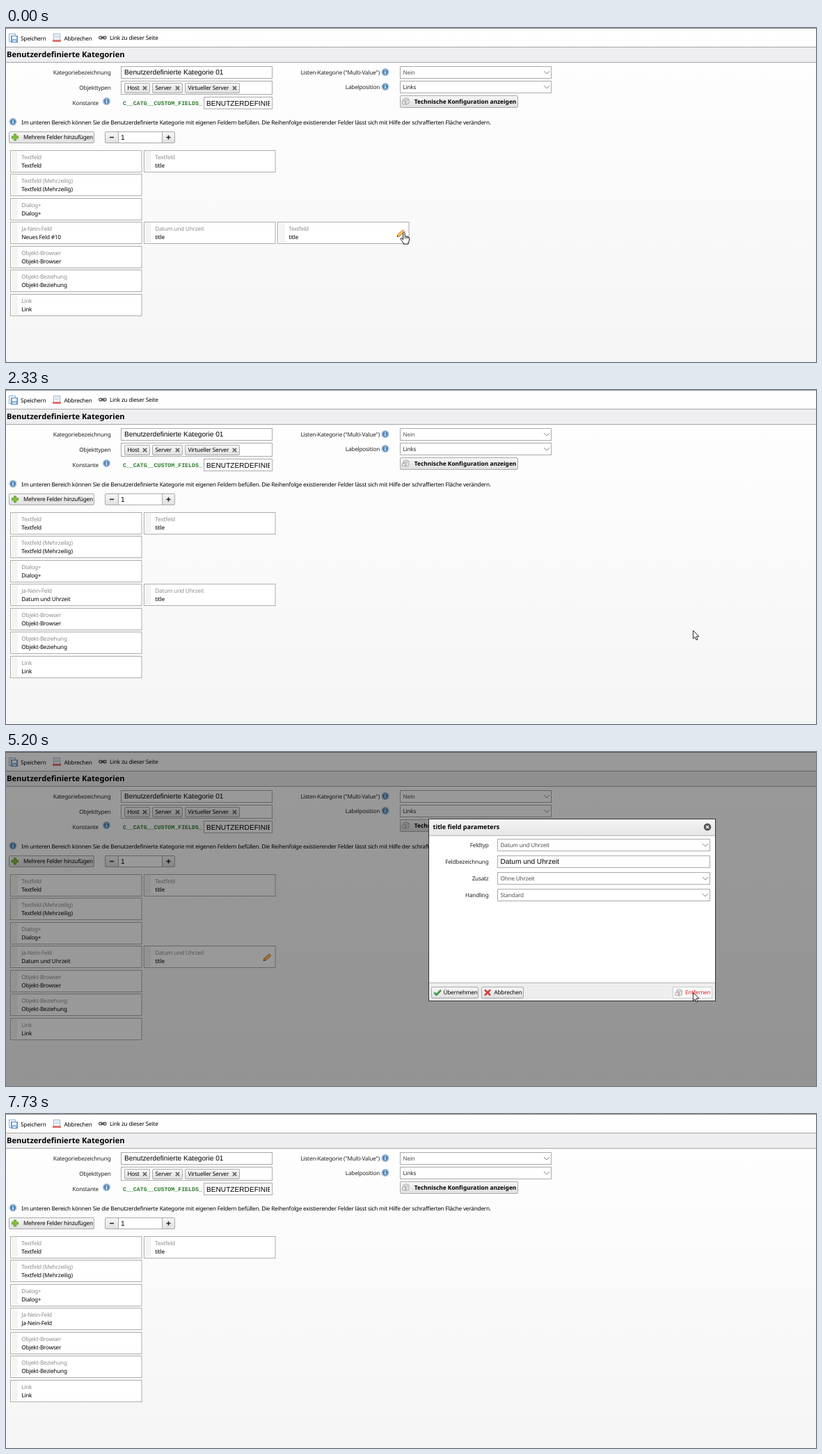
An HTML page with a canvas for the animation above (8.19 s loop, 1164 by 481 pixels).

```html
<!DOCTYPE html>
<html lang="de">
<head>
<meta charset="utf-8">
<title>Benutzerdefinierte Kategorien</title>
<style>
html, body { margin: 0; width: 100%; height: 100%; overflow: hidden; background: #fff; }
canvas { display: block; width: 1164px; height: 481px; }
</style>
</head>
<body>
<canvas id="stage" width="1164" height="481"></canvas>
<script>
const ctx = document.getElementById('stage').getContext('2d');
const W = 1164, H = 481, LOOP = 8190, TICK = 200 / 3;
const UI = '8.2px "Noto Sans", sans-serif';
const FIELD = '10.15px "Liberation Sans", Arial, sans-serif';
const bold = size => `bold ${size}px "Noto Sans", sans-serif`;

function text(str, x, y, { font = UI, color = '#000', align = 'left' } = {}) {
  ctx.font = font;
  ctx.letterSpacing = font === UI ? '-0.2px' : '0px';
  ctx.textRendering = 'geometricPrecision';
  ctx.textAlign = align;
  ctx.fillStyle = color;
  ctx.fillText(str, x, y);
}

function rect(x, y, w, h, fill) {
  ctx.fillStyle = fill;
  ctx.fillRect(x, y, w, h);
}

function box(x, y, w, h, fill = '#fff', border = '#aaa') {
  rect(x, y, w, h, border);
  rect(x + 1, y + 1, w - 2, h - 2, fill);
}

function shade(y, h, top, bottom) {
  const g = ctx.createLinearGradient(0, y, 0, y + h);
  g.addColorStop(0, top);
  g.addColorStop(1, bottom);
  return g;
}

// Flat list of x, y pairs.
function trace(pts, closed) {
  ctx.beginPath();
  for (let i = 0; i < pts.length; i += 2) ctx.lineTo(pts[i], pts[i + 1]);
  if (closed) ctx.closePath();
}

function line(pts, color, width = 1) {
  trace(pts);
  ctx.strokeStyle = color;
  ctx.lineWidth = width;
  ctx.stroke();
}

function shape(pts, fill, stroke, width = 1) {
  trace(pts, true);
  ctx.fillStyle = fill;
  ctx.fill();
  if (stroke) {
    ctx.strokeStyle = stroke;
    ctx.lineWidth = width;
    ctx.lineJoin = 'round';
    ctx.stroke();
  }
}

function disc(x, y, r, fill) {
  ctx.beginPath();
  ctx.arc(x, y, r, 0, 7);
  ctx.fillStyle = fill;
  ctx.fill();
}

function at(x, y, draw) {
  ctx.save();
  ctx.translate(x, y);
  draw();
  ctx.restore();
}

function cross(x, y, r, color, width) {
  line([x - r, y - r, x + r, y + r], color, width);
  line([x + r, y - r, x - r, y + r], color, width);
}

function plus(x, y, r, color, width) {
  line([x - r, y, x + r, y], color, width);
  line([x, y - r, x, y + r], color, width);
}

function info(x, y) {
  disc(x, y, 5.5, '#9fb8d0');
  disc(x, y, 4.8, '#d3e0ec');
  disc(x, y, 4.2, '#5288ba');
  rect(x - 0.7, y - 3, 1.4, 1.4, '#fff');
  rect(x - 0.7, y - 0.8, 1.4, 3.6, '#fff');
}

function button(x, y, w, h) {
  ctx.beginPath();
  ctx.roundRect(x + 0.5, y + 0.5, w - 1, h - 1, 1.5);
  ctx.fillStyle = shade(y, h, '#f8f8f8', '#dedede');
  ctx.fill();
  ctx.strokeStyle = '#aaa';
  ctx.lineWidth = 1;
  ctx.stroke();
}

function select(x, y, w, value, color = '#505050') {
  box(x, y, w, 18);
  text(value, x + 4.5, y + 12, { color });
  const r = x + w - 11;
  line([r, y + 7, r + 4, y + 11, r + 8, y + 7], '#777', 0.9);
}

function store(x, y) {
  shape([x - 3, y - 3, x + 1, y - 5, x + 5, y - 3, x + 5, y + 3, x + 1, y + 5, x - 3, y + 3], '#e2e2e2', '#a2a2a2', 0.8);
  line([x - 3, y - 3, x + 1, y - 1, x + 5, y - 3], '#aaa', 0.8);
  line([x + 1, y - 1, x + 1, y + 5], '#aaa', 0.8);
  disc(x - 2.5, y + 2, 2.7, '#999');
  disc(x - 2.5, y + 2, 1.9, '#eee');
}

function pencil(x, y, alpha) {
  ctx.save();
  ctx.globalAlpha = alpha;
  shape([x - 5.5, y + 5, x - 4.6, y + 1.5, x + 2.5, y - 4.8, x + 5.2, y - 2, x - 2, y + 4.3], '#f3b341', '#b87a22', 0.8);
  line([x - 3, y + 2.5, x + 3.6, y - 3.3], '#ffe09a', 1);
  shape([x + 2, y - 4.2, x + 3.4, y - 5.4, x + 5.9, y - 2.8, x + 4.6, y - 1.6], '#e59a76');
  shape([x - 5.7, y + 5.2, x - 5, y + 3, x - 3.5, y + 4.6], '#403020');
  ctx.restore();
}

function card(col, row, kind, title) {
  const x = 6 + col * 192, y = Math.floor(176 + row * 34.5);
  box(x, y, 189.5, 32, '#fff', '#adadad');
  for (let i = 0; i < 4; i++)
    for (let j = 0; j < 14; j++) rect(x + 3 + i * 2, y + 2 + j * 2, 1, 1, '#d2d2d2');
  text(kind, x + 16.2, y + 13, { color: '#8c8c8c' });
  text(title, x + 16.2, y + 25.3);
}

function toolbar() {
  rect(0, 0, W, 1, '#8c8c8c');
  box(4, 8, 10, 12, '#f2f7fc', '#8db3d8');
  box(7, 11, 10, 10, '#86b3de', '#5a8fc4');
  rect(9, 12, 6, 4, '#f4f9ff');
  rect(10, 18, 4, 2, '#eaf2fa');
  text('Speichern', 21, 17.5);

  box(68, 8, 10, 12, '#f2f6fb', '#9db6d4');
  rect(70, 11, 6, 1, '#c0d0e2');
  rect(70, 13, 6, 1, '#c0d0e2');
  rect(67, 17, 12, 3, '#e0726c');
  text('Abbrechen', 83.5, 17.5);

  ctx.strokeStyle = '#444';
  ctx.lineWidth = 1.2;
  for (const x of [133.6, 139.4]) {
    ctx.beginPath();
    ctx.roundRect(x, 12.2, 4.8, 3.6, 1.7);
    ctx.stroke();
  }
  line([136, 14, 142, 14], '#444', 1.2);
  text('Link zu dieser Seite', 149, 16.8);

  rect(0, 27, W, 23, '#a6a6a6');
  rect(0, 28, W, 21, '#eeeef0');
  text('Benutzerdefinierte Kategorien', 1, 42.2, { font: bold(11.1) });
}

function chip(x, w, label) {
  button(x, 79, w, 15);
  text(label, x + 4.5, 89.3);
  cross(x + w - 7.5, 86.5, 2.6, '#666', 1.6);
}

function form() {
  const right = { align: 'right', color: '#222' };
  text('Kategoriebezeichnung', 150.5, 66.7, right);
  text('Objekttypen', 150.5, 89.2, right);
  text('Konstante', 133, 111.2, right);
  text('Listen-Kategorie ("Multi-Value")', 537, 66.7, right);
  text('Labelposition', 537, 87.8, right);
  info(144.5, 105.5);
  info(545, 63.5);
  info(545, 84.5);

  box(165, 55, 218, 18);
  text('Benutzerdefinierte Kategorie 01', 170, 67.3, { font: FIELD });
  box(165, 76, 218, 20);
  chip(170, 37, 'Host');
  chip(210, 44, 'Server');
  chip(257, 79, 'Virtueller Server');
  text('C__CATG__CUSTOM_FIELDS_', 168, 110.5, {
    font: 'bold 8.26px "Liberation Mono", monospace', color: '#2f7d2f'
  });
  box(284, 99, 99, 18);
  ctx.save();
  ctx.beginPath();
  ctx.rect(285, 99, 94, 18);
  ctx.clip();
  text('BENUTZERDEFINIERTE', 288, 111.6, { font: FIELD });
  ctx.restore();

  select(566, 55, 218, 'Nein');
  select(566, 76, 218, 'Links', '#222');
  button(566, 97, 170, 18);
  store(574, 105.5);
  text('Technische Konfiguration anzeigen', 586.7, 108.6, { font: bold(8.4) });

  info(10, 135);
  text('Im unteren Bereich können Sie die Benutzerdefinierte Kategorie mit eigenen Feldern befüllen. ' +
    'Die Reihenfolge existierender Felder lässt sich mit Hilfe der schraffierten Fläche verändern.', 22.3, 138.8);

  button(4, 149, 123, 17);
  plus(13, 157.3, 5, '#5f9a2c', 4);
  plus(13, 157.3, 4.2, '#86bf45', 2.4);
  text('Mehrere Felder hinzufügen', 25, 160.3);
  button(142, 149, 20, 17);
  button(223, 149, 20, 17);
  box(161, 149, 64, 17);
  line([149, 157.5, 155, 157.5], '#222', 1.5);
  plus(233.5, 157.5, 3, '#222', 1.5);
  text('1', 165, 161, { font: FIELD });
}

function cards(t) {
  const rows = ['Textfeld', 'Textfeld (Mehrzeilig)', 'Dialog+', 'Ja-Nein-Feld',
    'Objekt-Browser', 'Objekt-Beziehung', 'Link'];
  const yesNo = t < 2330 ? 'Neues Feld #10' : t < 6530 ? 'Datum und Uhrzeit' : 'Ja-Nein-Feld';
  rows.forEach((name, i) => card(0, i, name, i === 3 ? yesNo : name));
  card(1, 0, 'Textfeld', 'title');
  if (t < 6530) card(1, 3, 'Datum und Uhrzeit', 'title');
  if (t < 2330) {
    card(2, 3, 'Textfeld', 'title');
    pencil(567.5, 295.7, 1);
  } else if (t >= 3800 && t < 6530) {
    const alpha = t < 4200 ? 0.85 : Math.min(1, 0.25 + (t - 4200) / 300);
    pencil(375.5, 295.7, alpha);
  }
}

function dialog(kind, title, extra, hover) {
  rect(0, 0, W, H, 'rgba(0,0,0,.4)');
  box(607, 96, 413, 263, '#fff', '#333');
  rect(608, 97, 411, 23, shade(97, 23, '#f4f4f4', '#e6e6e6'));
  rect(608, 120, 411, 1, '#b5b5b5');
  text('title field parameters', 613.5, 111.3, { font: bold(9) });
  disc(1008, 108, 5.3, '#555');
  cross(1008, 108, 2, '#fff', 1.3);

  ['Feldtyp', 'Feldbezeichnung', 'Zusatz', 'Handling'].forEach((label, i) =>
    text(label, 693.5, 137.2 + i * 24, { align: 'right', color: '#222' }));
  select(706, 125, 306, kind);
  box(706, 149, 306, 18);
  text(title, 710.5, 161.3, { font: FIELD });
  if (extra) select(706, 173, 306, extra);
  else box(706, 173, 306, 18, '#f6f6f6', '#d0d0d0');
  select(706, 197, 306, 'Standard');

  rect(608, 332, 411, 1, '#b5b5b5');
  rect(608, 333, 411, 25, '#eee');
  button(611, 338, 68, 17);
  line([615.5, 346.5, 618.5, 349.5, 625, 343], '#2e7d32', 2.6);
  line([615.8, 346.3, 618.5, 348.9, 624.7, 342.8], '#59b359', 1.2);
  text('Übernehmen', 628.5, 349.4);
  button(683, 338, 61, 17);
  cross(692, 346.3, 4, '#d83a36', 2.6);
  text('Abbrechen', 701.5, 349.4);
  if (hover) box(958, 338, 57, 17, '#fafafa', '#ccc');
  else button(958, 338, 57, 17);
  store(966.5, 346.5);
  text('Entfernen', 976, 349.4, { color: hover ? '#e02020' : '#000' });
}

// time, x, y, bend of the way leading here
const PATH = [
  [0, 570, 293], [733, 570, 293], [1600, 955, 349], [1870, 987, 346],
  [2933, 987, 346], [3800, 345, 296], [4070, 373.5, 297], [4400, 373.5, 297],
  [5200, 987, 346], [6930, 987, 346], [7670, 73, 437, -202], [LOOP, 73, 437]
];

function pointer(t) {
  const i = PATH.findIndex(p => p[0] > t);
  const [t0, x0, y0] = PATH[i - 1], [t1, x1, y1, bend = 0] = PATH[i];
  const s = (t - t0) / (t1 - t0), u = s * s * (3 - 2 * s);
  return [x0 + (x1 - x0) * u, y0 + (y1 - y0) * u + bend * 4 * u * (1 - u)];
}

function arrow(x, y) {
  at(x, y, () => shape([0.4, 0.4, 0.4, 12.2, 3.1, 9.6, 5.1, 14, 7, 13.2, 5.1, 8.9, 8.9, 8.9], '#fff', '#111', 0.9));
}

function hand(x, y) {
  at(x, y, () => {
    shape([-1.4, 1, -0.4, 0, 0.6, 0.2, 1.2, 1.2, 1.2, 5.4, 3.4, 5.6, 5.2, 6.2, 7.2, 7.2,
      7.7, 8.8, 7.3, 12, 6, 14.2, 6, 16.6, -0.8, 16.6, -1, 14.8, -3.2, 12, -4.9, 9.2,
      -4.4, 8.1, -3.2, 8.2, -1.4, 10.2], '#fff', '#111', 1);
    for (const fx of [1.2, 3.4, 5.4]) line([fx, 6, fx, 8.8], '#111', 0.8);
  });
}

function draw(t) {
  rect(0, 0, W, H, shade(0, H, '#fff', '#f5f5f6'));
  toolbar();
  form();
  cards(t);

  const tick = Math.floor((t + 3.4) / TICK) * TICK;
  const [x, y] = pointer(tick);
  const hover = x > 958;
  if (t >= 400 && t < 2330) dialog('Textfeld', 'Neues Feld #10', '', hover);
  if (t >= 4200 && t < 6530) dialog('Datum und Uhrzeit', 'Datum und Uhrzeit', 'Ohne Uhrzeit', hover);

  if (t >= 7730) return;
  if (t < 130) hand(572, 294.5);
  else if (t >= 6070 && t < 6530) hand(987.2, 345.5);
  else arrow(x, y);
}

const start = performance.now();
function frame() {
  draw((performance.now() - start) % LOOP);
  requestAnimationFrame(frame);
}
frame();
</script>
</body>
</html>
```
